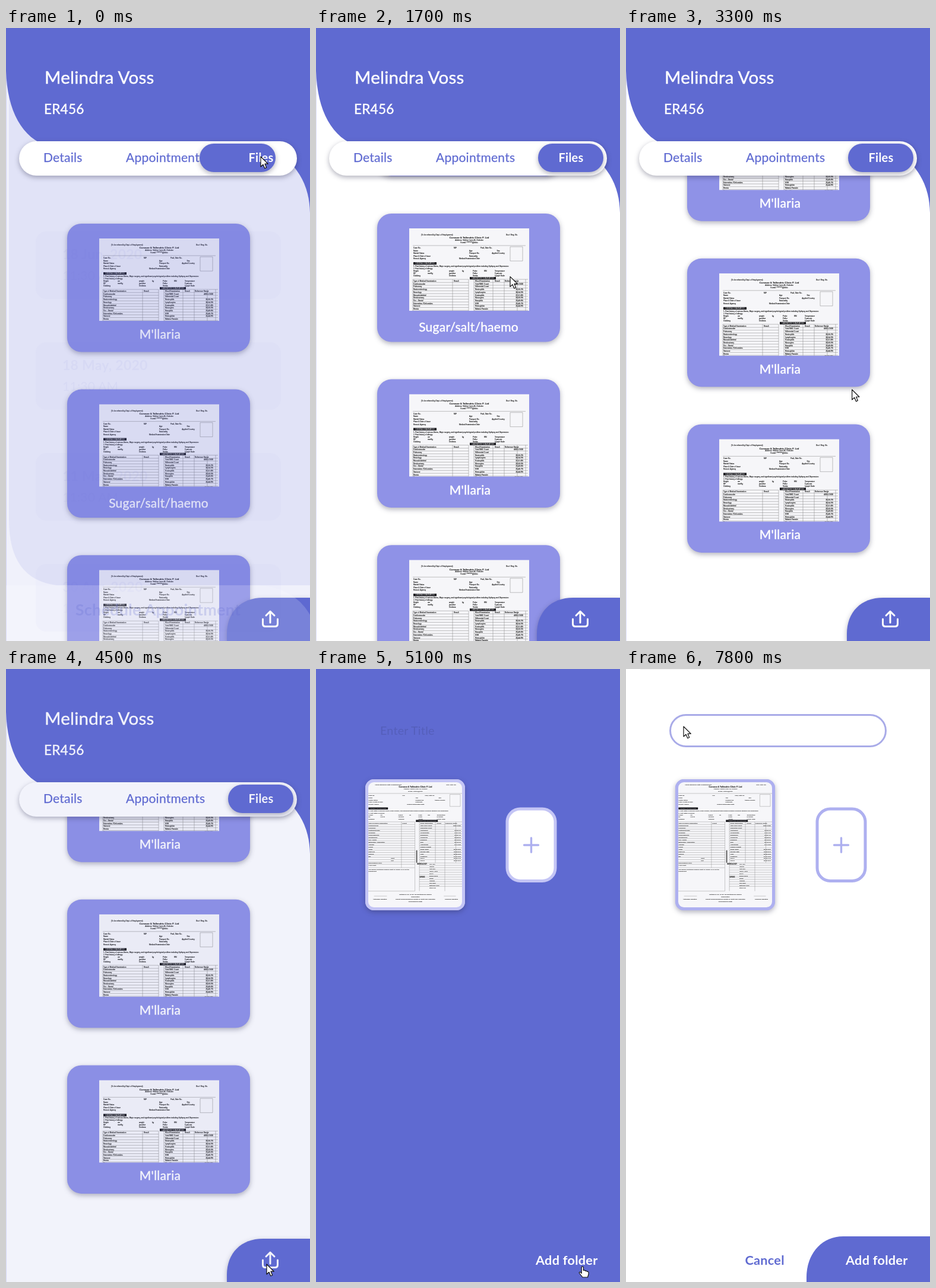
Animation of 512x1034 px, one loop 8 s. Source, as an HTML page:

```html
<!DOCTYPE html>
<html lang="en">
<head>
<meta charset="utf-8">
<title>Patient files</title>
<style>
  html, body { margin: 0; width: 100%; height: 100%; overflow: hidden; background: #fff; }
  svg { display: block; }
  #stage { width: 100%; height: 100%; font-family: Lato, "Open Sans", sans-serif; font-size: 21px; letter-spacing: .25px; }
  .doc { font-family: "Liberation Sans", Arial, sans-serif; font-size: 3px; letter-spacing: 0; fill: #222; }
  .doc text { stroke: #222; stroke-width: .12px; }
  .doc .tag { fill: #fff; stroke: none; font-size: 2.7px; text-anchor: middle; }
  .shade { filter: drop-shadow(0 3px 4px rgba(40, 40, 70, .36)); }
  .purple { fill: #5f6ad1; }
  .white { fill: #fff; }
  .semi { stroke-width: .45px; }
  .white.semi { stroke: #fff; }
  .purple.semi { stroke: #5f6ad1; stroke-width: .25px; }
  .bold { font-weight: 700; }
  .mid { text-anchor: middle; }
  .frame { fill: #fff; stroke-width: 5px; }
</style>
</head>
<body>
<svg id="stage" viewBox="0 0 512 1034">
  <defs><g id="doc" class="doc"></g></defs>

  <g id="files">
    <rect class="white" width="512" height="1034"/>
    <rect y="72" width="1" height="962" fill="#dfe0fa"/>
    <g id="cards"></g>
    <path class="purple shade" d="M372 1034V1022C372 985 396 961 433 961H512V1034Z"/>
    <g id="ghost"></g>
    <path d="M445 1003V985M438 991L445 984L452 991M432.500 997V1005Q432.500 1009.500 437 1009.500H453Q457.500 1009.500 457.500 1005V997"
      fill="none" stroke="#fff" stroke-width="3" stroke-linecap="round" stroke-linejoin="round"/>
    <path class="purple" d="M0 0H512V312C511 276 501 250 476 224L440 200H72C27 186 2 140 0 72Z"/>
    <text class="white semi" x="65" y="94" font-size="29.500">Melindra Voss</text>
    <text class="white semi" x="64" y="145" font-size="22.500">ER456</text>
    <rect class="white shade" x="22" y="191" width="468" height="58" rx="29"/>
    <text class="purple semi" x="63" y="226">Details</text>
    <text class="purple semi" x="202" y="226">Appointments</text>
    <rect id="pill" class="purple shade" y="195" height="48" rx="24"/>
    <text class="white bold" x="408.500" y="226" font-size="20">Files</text>
  </g>

  <g id="upload">
    <rect class="white" width="512" height="1034"/>
    <rect x="24" width="488" height="1" fill="#f0f0f0"/>
    <rect x="74.500" y="77.500" width="363" height="53" rx="26.500" fill="#fff" stroke="#a9abe8" stroke-width="3"/>
    <text class="purple bold" x="200.500" y="1005" font-size="21.700">Cancel</text>
    <path class="purple" d="M304 1034V1026C304 988 328 957 366 957H512V1034Z"/>
  </g>

  <rect id="veil" class="purple" width="512" height="1034"/>

  <g id="front">
    <text id="hint" x="108" y="111" font-size="19.700">Enter Title</text>
    <rect class="frame shade" x="85.500" y="188.500" width="163" height="216" rx="12"/>
    <svg x="88" y="191" width="158" height="211" viewBox="6.500 6.500 188 251"><use href="#doc"/></svg>
    <rect class="frame" x="85.500" y="188.500" width="163" height="216" rx="12" style="fill:none"/>
    <rect class="frame" x="322" y="236" width="81" height="121.500" rx="22"/>
    <path d="M362.500 285V309M350.500 297H374.500" stroke="#aeb0ef" stroke-width="3.400" stroke-linecap="round"/>
    <text class="white bold" x="370" y="1005" font-size="21.700">Add folder</text>
  </g>

  <g id="cursor" fill="#fff" stroke="#111" stroke-width="1.200" stroke-linejoin="round">
    <path id="arrow" d="M0 0V17L4 13.300L6.800 19.800L9.700 18.500L7 12.200H12.300Z"/>
    <path id="hand" d="M-1.800 1.500C-1.800-.7 1.400-.7 1.400 1.500V6.500C2.500 5.800 4.300 6 4.500 7.500C5.600 6.900 7.200 7.200 7.400 8.500C8.600 8 10 8.600 10 10V13L8.500 18H0L-5.500 11C-6 9.200-4 8.700-3 10L-1.800 11.500Z"/>
  </g>
</svg>
<script>
const $ = id => document.getElementById(id);
const LOOP = 8000, PITCH = 279.6;

const rect = (x, y, w, h, fill) => `<rect x="${x}" y="${y}" width="${w}" height="${h}" fill="${fill}"/>`;
const text = (x, y, s, extra = '') => `<text x="${x}" y="${y}" ${extra}>${s}</text>`;
const rule = d => `<path d="${d}" fill="none" stroke="#777" stroke-width=".45"/>`;
const tag = (x, y, w, s) => rect(x, y, w, 4.2, '#15151a') + text(x + w / 2, y + 3.2, s, 'class="tag"');

function buildDoc() {
  const mid = 'class="mid"', bold = 'font-weight="700"', ROW = 4.7;
  const tests = ['Cardiovascular', 'Pulmonary', 'Gastroenterology', 'Neurology', 'Musculoskeletal', 'Genitourinary',
    'Oro - Dental', 'Extremities / Deformities', 'Varicose', 'Hernia', 'Vision', 'Right eye', 'Left eye',
    'Ear', 'Right', 'Left', 'Psychological check', 'X-ray chest'];
  const labs = ['Total WBC Count', 'Differential Count', 'Neutrophils', 'Lymphocytes', 'Eosinophils', 'Monocytes',
    'Basophils', 'ESR', 'Hemoglobin', 'Malaria Parasite', 'Blood Sugar', 'Bilirubin Total', 'Urea', 'Creatinine', 'SGPT', 'SGOT'];
  const serum = ['HIV I &amp; II', 'HBsAg', 'Anti HCV', 'VDRL / RPR', 'TPHA', 'Blood Group', 'Sugar', 'Albumin',
    'Pus Cells', 'Epithelial Cells', 'Stool R/E'];
  const facts = ['Name', 'Marital Status', 'Place &amp; Date of Issue', 'Recruit. Agency'];
  const more = ['Age', 'Passport No.', 'Nationality', 'Medical Examination Date'];

  let s = rect(0, 0, 202, 270, '#f6f6f9')
    + text(20, 12, '(To be referred by Dept. of Employment)')
    + text(163, 12, 'Gov / Reg. No.')
    + text(101, 17.3, 'Corvane &amp; Tallendric Clinic P. Ltd', `${mid} font-size="4.2" ${bold}`)
    + text(101, 21, 'Address: Veldrun Lane 45, Orsholm', mid)
    + text(101, 25, 'E-mail: ********@clinic', mid)
    + rule('M6 29H196M170 31H191V55H170Z')
    + text(7, 34, 'Case No.') + text(75, 34, 'M/F') + text(120, 34, 'Paid, Date No.');
  facts.forEach((f, i) => {
    const y = 38.5 + i * 4.5;
    s += text(7, y, f) + text(i === 3 ? 84 : 101, y, more[i]);
    if (i < 2) s += text(150, y, ['Sex', 'Applied Country'][i], mid);
  });
  s += tag(7, 57, 39, 'GENERAL EXAMINATION')
    + text(7, 65, '1. Past history of serious illness, Major surgery, and significant psychological problem including Epilepsy and Depression:')
    + text(7, 69, '2. Past history of allergy:');
  [['Height', 'cm', 'weight', 'kg', 'Pulse', 'BM', 'Temperature'],
   ['BP', 'mmHg', 'jaundice', '', 'Pallor', '', 'Cyanosis'],
   ['Clubbing', '', 'Oedema', '', 'Sentia', '', 'Lymph Node']]
    .forEach((row, r) => row.forEach((w, i) => s += text([7, 31, 67, 89, 107, 126, 144][i], 73 + r * 4, w)));
  s += tag(102, 82, 44, 'LABORATORY EXAMINATION');

  let lines = 'M6 86H100V178H6M73 86V178M100 178V225H6V86M109 86V225M109 86H200M141 86V168M160 86V225M182 86V168M196 86V225';
  const row = (x, y, x1, x2, w) => {
    s += text(x, y, w);
    lines += `M${x1} ${y - 3.5}H${x2}`;
  };
  s += text(7, 90, 'Type of Medical Examination') + text(75, 90, 'Result')
    + text(111, 90, 'Blood Examination') + text(144, 90, 'Result') + text(161, 90, 'Reference Range');
  tests.forEach((w, i) => row(/^(Right|Left)$/.test(w) ? 52 : 7, 94.7 + i * ROW, 6, 100, w));
  labs.forEach((w, i) => {
    const y = 94.7 + i * ROW, low = 40 - i * 2;
    row(111, y, 109, 200, w);
    if (i !== 1 && i !== 9) s += text(192, y, i ? `${low}-${low + 20}.${i}%` : '4000-11000', 'text-anchor="end"');
  });
  serum.forEach((w, i) => row(129, 172 + i * ROW, 109, 200, w));
  s += text(104, 172, 'SEROLOGY', `${bold} font-size="3.6"`) + text(109, 198, 'URINE', `${bold} font-size="3.6"`)
    + rect(102.500, 143, 2.2, 25, '#555')
    + text(7, 182, 'The person mentioned medical report of (Name) is FIT for the')
    + text(7, 186, 'requirement') + rule(lines)
    + text(101, 233, 'Certified is (Mr. or Ms.) as mentioned for Medical', mid) + text(101, 237, 'Examination', mid)
    + rule('M18 235H44M158 235H182')
    + text(16, 242, 'Authorized Signature') + text(101, 242, 'Format Recommended by Ministry of Health and Population', mid)
    + text(160, 242, 'Physician Signature') + text(101, 246.5, 'Government of State', mid);
  $('doc').innerHTML = s;
}

function buildCards() {
  $('cards').innerHTML = [0, 1, 2, 3, 4].map(i => {
    const y = 330 + i * PITCH, sugar = i === 1;
    return `<rect class="shade" x="103" y="${y}" width="308" height="216.5" rx="24" fill="#8f92e7"/>
      <svg x="157" y="${y + 25}" width="202" height="139"><use href="#doc"/></svg>`
      + text(sugar ? 257 : 259.5, y + (sugar ? 199 : 194), sugar ? 'Sugar/salt/haemo' : "M'llaria", 'class="white semi mid"');
  }).join('');
}

// The appointments page, seen while it dissolves away.
function buildGhost() {
  const days = ['18 Jun, 2020', '18 May, 2020', '11 May, 2020', '30 Apr, 2020'];
  $('ghost').innerHTML = `<g class="purple">
      <rect width="512" height="1034" opacity=".09"/>
      <path d="M5 72H512V940H85Q5 930 5 830Z" opacity=".1"/></g>`
    + days.map((d, i) => {
      const y = 343 + i * 187;
      return `<g class="purple"><rect x="50" y="${y}" width="413" height="114" rx="18" opacity=".022"/>
        <g opacity=".05">${text(95, y + 47, d, 'class="bold" font-size="23"')}${text(95, y + 82, '11:30 AM')}</g></g>`;
    }).join('')
    + '<path d="M0 940H424Q486 944 512 990V1034H0Z" fill="#fff" opacity=".16"/>'
    + text(256, 991, 'Schedule Appointment', 'class="purple bold mid" font-size="27" opacity=".22"');
}

// Smooth monotone curve through rows of [time, value, ...].
function track(t, keys, c = 1) {
  const n = keys.length - 1;
  if (t <= keys[0][0]) return keys[0][c];
  if (t >= keys[n][0]) return keys[n][c];
  const i = keys.findIndex(k => k[0] > t) - 1;
  const slope = j => j < 0 || j >= n ? 0 : (keys[j + 1][c] - keys[j][c]) / (keys[j + 1][0] - keys[j][0]);
  const tangent = j => {
    const a = slope(j - 1), b = slope(j);
    return a * b > 0 ? 2 * a * b / (a + b) : 0;
  };
  const h = keys[i + 1][0] - keys[i][0], u = (t - keys[i][0]) / h, v = 1 - u;
  return v * v * (1 + 2 * u) * keys[i][c] + u * u * (3 - 2 * u) * keys[i + 1][c]
    + h * u * v * (v * tangent(i) - u * tangent(i + 1));
}

const pointer = [
  [0, 429, 217], [350, 429, 217], [1000, 332, 728], [1150, 332, 728], [1700, 327, 420], [2300, 306, 43],
  [2650, 306, 43], [2900, 262, 110], [3600, 457, 916], [4300, 439, 1004], [4600, 439, 1004], [4900, 449, 1008],
  [5920, 449, 1008], [6200, 329, 457], [6320, 329, 457], [7200, 111, 110], [7500, 97, 97]
];
const scroll = [[1150, 0], [1700, 296], [2300, 694], [2700, 780]];
const veil = [[4400, 0], [4500, .08], [4900, 1], [5100, 1], [5400, 0]];

const show = (id, on) => $(id).style.display = on ? '' : 'none';
const fade = (id, a) => $(id).setAttribute('opacity', a);

function draw(t) {
  $('cards').setAttribute('transform', `translate(0 ${-track(t, scroll)})`);
  $('pill').setAttribute('x', track(t, [[0, 326], [300, 374]]));
  $('pill').setAttribute('width', track(t, [[0, 128], [300, 110]]));
  fade('ghost', track(t, [[0, 1], [350, 0]]));

  show('files', t < 5000);
  show('upload', t >= 5000);
  fade('veil', track(t, veil));
  fade('front', track(t, [[4800, 0], [5050, 1]]));
  fade('hint', t < 7400 ? track(t, [[5000, 0], [5100, .1], [5400, .24]]) : 0);
  const pale = track(t, [[5100, 1], [5400, 0]]);
  const edge = `rgb(${174 + 22 * pale},${176 + 21 * pale},${240 + 5 * pale})`;
  document.querySelectorAll('.frame').forEach(f => f.setAttribute('stroke', edge));

  const hand = t >= 4800 && t < 5960;
  show('hand', hand);
  show('arrow', !hand);
  $('cursor').setAttribute('transform', `translate(${track(t, pointer)} ${track(t, pointer, 2)})`);
}

buildDoc();
buildCards();
buildGhost();
const start = performance.now();
function tick() {
  draw((performance.now() - start) % LOOP);
  requestAnimationFrame(tick);
}
tick();
</script>
</body>
</html>
```
